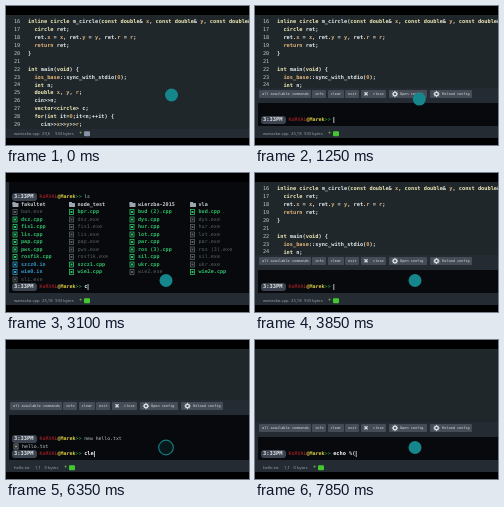
An HTML page with a canvas that plays this animation: 243x139 px, repeating every 8000 ms.

```html
<!DOCTYPE html>
<html lang="en">
<head>
<meta charset="utf-8">
<style>
html, body { margin: 0; width: 100%; height: 100%; overflow: hidden; background: #000; }
canvas { display: block; }
</style>
</head>
<body>
<canvas id="stage" width="243" height="139"></canvas>
<script>
const ctx = document.getElementById('stage').getContext('2d');
const LOOP = 8000, WIDTH = 243, TOP = 9, BOTTOM = 123, PROMPT_Y = 114;
const MONO = '"DejaVu Sans Mono", monospace', SANS = '"Open Sans", sans-serif';

const code = `inline circle m_circle(const double& x, const double& y, const double& r) {
  circle ret;
  ret.x = x, ret.y = y, ret.r = r;
  return ret;
}

int main(void) {
  ios_base::sync_with_stdio(0);
  int n;
  double x, y, r;
  cin>>n;
  vector<circle> c;
  for(int it=0;it<n;++it) {
    cin>>x>>y>>r;`.split('\n');

const welcome = [
  'Please enter new commands to the box below.',
  'The console supports special anotattion like: %(path), %(file), %(link)file.something',
  'It also supports special HTML elements like: %(tooltip:A:content:B) and so on.',
  "Hope you'll enjoy the terminal."
];

const listing = `fakultet|node_test|wierzba-2015|vla
ban.exe|bpr.cpp|bud (2).cpp|bud.cpp
dsz.cpp|dsz.exe|dys.cpp|dys.exe
fis1.cpp|fis1.exe|hur.cpp|hur.exe
lis.cpp|lis.exe|lot.cpp|lot.exe
pap.cpp|pap.exe|par.cpp|par.exe
pws.cpp|pws.exe|ros (3).cpp|ros (3).exe
rosfik.cpp|rosfik.exe|sil.cpp|sil.exe
szcz0.in|szcz1.cpp|ukr.cpp|ukr.exe
wie0.in|wie1.cpp|wie2.exe|wie2e.cpp
sli.exe`.split('\n').map(row => row.split('|'));

// Each scene runs until the next one; keys are the times of the typed letters.
const scenes = [
  { from: 0, top: 37, output: showWelcome, cmd: 'clear', keys: [650, 740, 830, 910, 990] },
  { from: 1150, top: 82, cmd: 'ls', keys: [1600, 1740] },
  { from: 2400, top: -6, output: showListing, cmd: 'clear', keys: [3050, 3140, 3220, 3290, 3350] },
  { from: 3650, top: 82, cmd: 'new hello.txt',
    keys: [4050, 4150, 4250, 4350, 4430, 4500, 4560, 4600, 4750, 4820, 4900, 4990, 5090] },
  { from: 5400, top: 60, output: showCreated, cmd: 'clear', keys: [5750, 5850, 6340, 6550, 6650] },
  { from: 6900, top: 82, cmd: 'echo %(', keys: [7100, 7160, 7220, 7290, 7350, 7600, 7840] }
];

const progress = (t, from, length) => Math.min(1, Math.max(0, (t - from) / length));

function box(x, y, w, h, color, radius = 0) {
  ctx.fillStyle = color;
  ctx.beginPath();
  ctx.roundRect(x, y, w, h, radius);
  ctx.fill();
}

function text(str, x, y, color, size, family = MONO, weight = '') {
  ctx.font = `${weight} ${size}px ${family}`;
  ctx.fillStyle = color;
  ctx.fillText(str, x, y);
  return x + ctx.measureText(str).width;
}

function tokenColor(token) {
  if (/^(return|ios_base|x|y|r)$/.test(token)) return '#e3b27a';
  if (/^(inline|const|for|int|double|void|circle|vector)$/.test(token)) return '#efe9b4';
  return /^\d/.test(token) ? '#e5a65b' : '#e2e8e8';
}

function drawCode() {
  code.forEach((line, i) => {
    const y = 15.7 + i * 7.93;
    text(String(16 + i), 8, y, '#c3cacb', 5.2);
    let x = 22;
    for (const token of line.match(/\w+|\W+/g) || []) {
      x = text(token, x, y, tokenColor(token), 5.3, MONO, 'bold');
    }
  });
}

function gear(x, y) {
  ctx.strokeStyle = '#d5dade';
  ctx.lineWidth = 1.4;
  ctx.beginPath();
  ctx.arc(x, y, 1.8, 0, 7);
  ctx.stroke();
  ctx.lineWidth = 0.9;
  for (let a = 0; a < 6; a += Math.PI / 4) {
    ctx.beginPath();
    ctx.moveTo(x + 2 * Math.cos(a), y + 2 * Math.sin(a));
    ctx.lineTo(x + 3.2 * Math.cos(a), y + 3.2 * Math.sin(a));
    ctx.stroke();
  }
}

function drawTools(y) {
  const buttons = [['all available commands', 4, 52, 7], ['info', 57, 14, 60], ['clear', 73, 16, 75.5],
    ['exit', 90, 14, 93], ['close', 106, 25, 118], ['Open config', 134, 38, 145], ['Reload config', 175, 42, 187]];
  for (const [label, x, width, textX] of buttons) {
    box(x, y - 4, width, 8, '#454c56', 1);
    text(label, textX, y + 0.2, '#d5dade', 3.55);
  }
  text('✖', 108.5, y, '#d5dade', 6, '"DejaVu Sans", sans-serif');
  gear(140, y);
  gear(181.5, y);
}

function drawPrompt(y, stamp) {
  box(6, y - 4, 25, 8, '#3b4450', 3);
  text(stamp, 8, y, '#e4e8ea', 5.4, MONO, 'bold');
  let x = text('KoRVAL', 33.5, y, '#c0272b', 5);
  x = text('@Marek', x, y, '#dccb45', 5, MONO, 'bold');
  return text('>>', x, y, '#38b44a', 5) + 2.5;
}

function showWelcome() {
  welcome.forEach((line, i) => text(line, 8, 69 + i * 8, '#b9bec2', 4.78));
}

function fileIcon(x, y, color) {
  ctx.strokeStyle = color;
  ctx.lineWidth = 0.8;
  ctx.strokeRect(x + 0.5, y - 2.5, 4, 5);
  box(x + 1.5, y - 1, 2, 2, color);
}

function showListing() {
  text('ls', drawPrompt(24, '3:33PM'), 24, '#c5cacd', 4.8);
  const columns = [15, 71.5, 132, 192.5];
  listing.forEach((row, r) => row.forEach((name, c) => {
    const y = 31.5 + r * 7.5, x = columns[c], icon = x - 8.5;
    const kind = name.split('.')[1];
    const color = { cpp: '#30bd69', exe: '#596163', in: '#3298c8' }[kind] || '#c9ced2';
    if (kind) {
      fileIcon(icon, y, color);
    } else {
      box(icon, y - 2.5, 3, 2, '#9aa6b0');
      box(icon, y - 1.6, 6, 4, '#9aa6b0', 0.5);
    }
    text(name, x, y, color, 5.1, MONO, kind === 'exe' ? '' : 'bold');
  }));
}

function showCreated() {
  text('new hello.txt', drawPrompt(99, '3:33PM'), 99, '#b9bec2', 4.8);
  fileIcon(7.5, 106.5, '#8d9798');
  text('hello.txt', 16, 106.5, '#c5cacd', 4.9);
}

function drawTerminal(scene, t) {
  const hidden = 0.5 + 0.5 * Math.cos(Math.PI * progress(t, 50, 350));
  const base = scene.top + 15;
  ctx.save();
  ctx.translate(0, (BOTTOM - scene.top) * hidden);
  box(0, scene.top, WIDTH, BOTTOM - scene.top, '#242b33');
  box(3, base, WIDTH - 3, BOTTOM - 3 - base, '#07090c');
  ctx.globalAlpha = progress(t, 450, 500);
  drawTools(scene.top + 6);
  ctx.globalAlpha = 1;
  if (scene.output) scene.output();
  const x = drawPrompt(PROMPT_Y, t < 1150 ? '3:32PM' : '3:33PM');
  const typed = scene.keys.filter(key => key <= t).length;
  const end = text(scene.cmd.slice(0, typed), x, PROMPT_Y, '#f3f5f6', 5.3, MONO, 'bold');
  box(end + 0.3, PROMPT_Y - 3, 0.8, 6, '#dfe5e8');
  ctx.restore();
}

function drawStatus(t) {
  box(0, BOTTOM, WIDTH, 9, '#242b33');
  const parts = t < 5500
    ? [['wariacko.cpp', 8], [t < 50 ? '29,6' : '25,18', 36], ['933 bytes', 49], ['+', 73]]
    : [['hello.txt', 8], ['1,1', 29], ['0 bytes', 38.5], ['+', 58]];
  for (const [label, x] of parts) {
    text(label, x, 127.7, label === '+' ? '#8ed75c' : '#9fa8ae', label === '+' ? 6 : 4.2, SANS);
  }
  box(t < 5500 ? 78 : 63, 125.3, 6, 5, t < 50 ? '#8793a6' : '#43c92f', 1);
}

function drawPointer(t) {
  const p = progress(t, 1100, 500);
  const ease = p * p * (3 - 2 * p);
  const ring = t >= 6300 && t < 6500;
  ctx.beginPath();
  ctx.arc(165.5 - 5.5 * ease, 89 + 18.5 * ease, ring ? 7.3 : 6.5, 0, 7);
  ctx.fillStyle = ring ? '#06181a' : '#14868c';
  ctx.fill();
  if (ring) {
    ctx.strokeStyle = '#15777c';
    ctx.lineWidth = 1.2;
    ctx.stroke();
  }
}

function draw(t) {
  ctx.textBaseline = 'middle';
  box(0, 0, WIDTH, 139, '#000');
  ctx.save();
  ctx.beginPath();
  ctx.rect(0, TOP, WIDTH, BOTTOM - TOP);
  ctx.clip();
  box(0, TOP, WIDTH, BOTTOM - TOP, '#1f272b');
  if (t < 5500) drawCode();
  if (t >= 50) drawTerminal(scenes.filter(scene => scene.from <= t).pop(), t);
  ctx.restore();
  drawStatus(t);
  drawPointer(t);
}

const start = performance.now();
function tick() {
  draw((performance.now() - start) % LOOP);
  requestAnimationFrame(tick);
}
tick();
</script>
</body>
</html>
```
